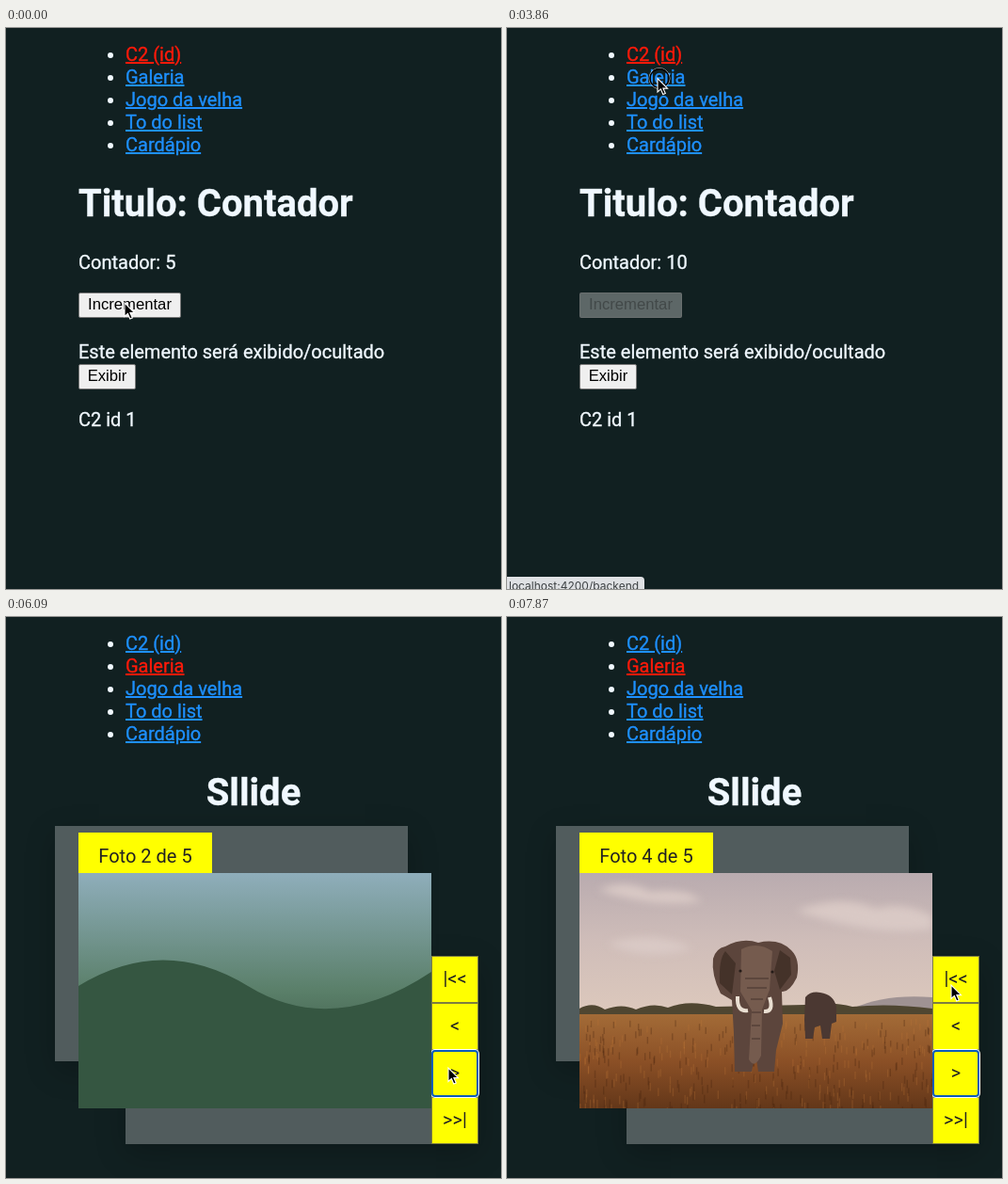
An HTML page with a canvas for the animation above (8000 ms loop, 526 by 596 pixels).

```html
<!DOCTYPE html>
<html lang="pt">
<head>
<meta charset="utf-8">
<title>Contador e galeria</title>
<style>
  html, body { margin: 0; width: 100%; height: 100%; overflow: hidden; }
  body { position: relative; background: #112021; color: #f0f8ff; font: 20px/24px Roboto, sans-serif; }
  body > *, section > *, #pager b { position: absolute; margin: 0; white-space: nowrap; }
  section { inset: 0; }
  ul, h1, p { -webkit-text-stroke: .35px; }
  ul { left: 127px; top: 16px; padding: 0; list-style: disc; }
  li { color: #1e90ff; text-decoration: underline; }
  li.on { color: #ff1a0a; }
  li::marker { color: #f0f8ff; }
  h1 { left: 77px; top: 163px; font: bold 40px/48px Roboto, sans-serif; }
  #gallery h1 { left: 0; width: 526px; text-align: center; }
  p { left: 77px; }
  .btn { left: 77px; height: 27px; box-sizing: border-box; border: 1px solid #767676; border-radius: 2px;
         background: #efefef; color: #000; font: 16.67px/24px "Liberation Sans", Arial, sans-serif; text-align: center; }
  .btn.off { background: rgba(239,239,239,.34); border-color: rgba(118,118,118,.5); color: rgba(16,16,16,.35); }
  .card { width: 375px; background: rgba(255,255,255,.27); box-shadow: 0 10px 30px rgba(0,0,0,.22); }
  #back { left: 77px; top: 272px; height: 250px; }
  #pager { left: 77px; top: 322px; height: 200px; }
  #pager b { left: 325px; width: 50px; height: 50px; box-sizing: border-box; border: 1px solid #7d7d40; background: #ff0;
             color: #222; font-weight: 400; line-height: 46px; text-align: center; }
  #pager b.focus { border: 2px solid #0b5cb8; border-radius: 4px; box-shadow: 0 0 0 1px #fff; line-height: 44px; z-index: 1; }
  #photo { left: 77px; top: 272px; }
  #label { left: 77px; top: 229px; width: 142px; height: 43px; background: #ff0; color: #222; line-height: 50px; text-align: center; }
  #status { left: 0; top: 583px; width: 144px; height: 13px; padding-left: 2px; overflow: hidden; background: #dfe1e4;
            color: #3c4043; border-radius: 0 4px 0 0; font: 12px/19px Inter, sans-serif; }
  #cursor { left: 0; top: 0; overflow: visible; }
</style>
</head>
<body>
<ul><li>C2 (id)</li><li>Galeria</li><li>Jogo da velha</li><li>To do list</li><li>Cardápio</li></ul>

<section id="counter">
  <h1>Titulo: Contador</h1>
  <p id="count" style="top:237px"></p>
  <div id="inc" class="btn" style="top:281px;width:109px">Incrementar</div>
  <p id="extra" style="top:332px">Este elemento será exibido/ocultado</p>
  <div id="toggle" class="btn" style="width:61px">Exibir</div>
  <p id="route">C2 id 1</p>
</section>

<section id="gallery">
  <h1>Sllide</h1>
  <div id="back" class="card"></div>
  <div id="pager" class="card"><b>|&lt;&lt;</b><b>&lt;</b><b>&gt;</b><b>&gt;&gt;|</b></div>
  <canvas id="photo" width="375" height="250"></canvas>
  <div id="label"></div>
</section>

<div id="status">localhost:4200/backend</div>
<svg id="cursor" width="1" height="1">
  <g id="press" fill="none">
    <circle cx="2" cy="0" r="11" stroke="#fff" stroke-opacity=".6"/>
    <circle cx="2" cy="0" r="10" stroke="#000" stroke-width="1.3"/>
  </g>
  <path d="M0 0V14.5L3.4 11.4L5.8 17L8.3 15.9L5.9 10.6H10.5Z" fill="#000" stroke="#fff" stroke-width="1.1"/>
</svg>

<script>
const $ = id => document.getElementById(id);
const g = $('photo').getContext('2d');
const LOOP = 8000, STEP = 148.4;

// Pointer path: step, x, y
const path = [
  [0, 126, 292], [5, 126, 293], [6, 119, 315], [7, 106, 345], [8, 101, 357], [10, 100, 370],
  [13, 100, 371], [15, 101, 362], [17, 101, 353], [21, 101, 351], [22, 102, 350], [23, 122, 190],
  [24, 148, 72], [25, 160, 54], [27, 160, 53], [28, 196, 120], [29, 270, 320], [30, 314, 431],
  [32, 372, 453], [34, 445, 473], [36, 470, 479], [42, 470, 479], [43, 467, 440], [45, 466, 434],
  [48, 466, 434], [49, 469, 470], [51, 470, 480], [52, 471, 432], [53, 472, 391]
];
const presses = [10, 21, 26, 40, 45, 47, 50];
// Slide changes: first step, slide number
const slides = [[0, 1], [41, 2], [44, 1], [45, 5], [47, 4], [48, 3], [51, 4]];

function pointer(n) {
  const i = path.findIndex(p => p[0] >= n);
  const b = path[i], a = path[Math.max(0, i - 1)];
  const k = b[0] === a[0] ? 0 : (n - a[0]) / (b[0] - a[0]);
  return [a[1] + (b[1] - a[1]) * k, a[2] + (b[2] - a[2]) * k];
}

function fade(y0, y1, ...colors) {
  const f = g.createLinearGradient(0, y0, 0, y1);
  colors.forEach((c, i) => f.addColorStop(i / (colors.length - 1), c));
  return f;
}
function shape(fill, d) {
  g.fillStyle = fill;
  g.fill(new Path2D(d));
}
function line(color, width, d) {
  g.strokeStyle = color;
  g.lineWidth = width;
  g.stroke(new Path2D(d));
}
function oval(fill, x, y, rx, ry, turn = 0) {
  g.fillStyle = fill;
  g.beginPath();
  g.ellipse(x, y, rx, ry, turn, 0, 7);
  g.fill();
}
function rect(fill, x, y, w, h) {
  g.fillStyle = fill;
  g.fillRect(x, y, w, h);
}
function blur(px) {
  g.filter = px ? `blur(${px}px)` : 'none';
}
function random(seed) {
  return () => (seed = seed * 16807 % 2147483647) / 2147483647;
}

function lake() {
  rect(fade(0, 110, '#a3aab4', '#c3c7cc', '#a9b5c1'), 0, 0, 375, 130);
  blur(4);
  shape('#d6d6d6', 'M120 10Q165 -4 205 6Q240 0 262 20Q300 12 375 20V40Q340 50 300 46Q260 40 225 62Q185 72 158 52Z');
  shape('#7b8a9c', 'M95 -5H185Q165 22 125 14ZM215 16Q255 30 300 8Q330 0 380 2V16Q310 26 262 36Q225 36 215 16Z');
  oval('#e0dfdd', 180, 42, 26, 12);
  oval('#dad9d8', 250, 10, 22, 8);
  blur(1.5);
  shape(fade(50, 126, '#7488a0', '#375878'), 'M165 126L195 96L216 84L237 66L262 62L283 52L305 48L335 60L375 52V126Z');
  shape('#c3cad2', 'M226 78L240 66L262 64L248 76L240 90ZM283 54L304 49L296 62L284 74Z');
  shape('#2f4e70', 'M188 126L222 100L240 84L262 103L282 80L305 108L322 72L375 86V126Z');
  shape(fade(0, 126, '#2a4058', '#4b6278', '#2e4657'), 'M0 0H70L98 20L121 42L139 65L160 84L178 101L205 116L212 126H0Z');
  shape('#1b2f45', 'M0 0H45L58 22L34 42L66 70L100 88L135 112L150 126H0Z');
  shape('#63758a', 'M74 8L98 28L125 62L148 92L112 78L92 46Z');
  shape('#26394a', 'M0 104Q60 96 110 108L212 126H0Z');
  blur(0);
  rect(fade(126, 220, '#167f87', '#1f9698', '#2ea3a1'), 0, 126, 375, 124);
  rect('#8fd0cc', 0, 126, 290, 1.5);
  blur(2);
  shape('#d3e2e5', 'M207 133L220 142L241 152L264 166V190L226 204L148 204L158 186L176 170L188 148Z');
  shape('#9fcdd1', 'M165 176L200 166L214 178L190 186ZM222 178L250 170L246 186Z');
  blur(.7);
  shape('#8f847b', 'M0 246L30 236L72 226L108 214L148 204L180 190L228 185L262 190L300 196L375 200V250H0Z');
  shape('#565a61', 'M140 230L190 208L265 192L375 205V250H178L170 238Z');
  shape('#5c544e', 'M0 250L38 240L78 246L115 221L165 220L128 250Z');
  shape('#a59a90', 'M62 236L92 222L108 226L84 238ZM120 217L160 205L186 203L150 216Z');
  shape('#7a7c83', 'M196 216L240 197L278 202L250 219ZM220 239L260 226L296 234L290 247Z');
  line('#35383e', 1.5, 'M165 232L215 224L250 220L286 208M205 250L230 230L300 236');
  shape(fade(60, 250, '#e1ddd6', '#ddd8d0', '#c3b8ad'),
    'M315 62Q323 70 330 82L343 76Q352 90 354 102Q371 112 375 130V232L352 242L340 240L338 247L312 249' +
    'Q294 246 292 230Q288 212 284 196Q265 200 258 184Q260 155 275 142L292 136Q280 138 276 131Q277 125 290 120Q303 108 308 97Q312 78 315 62Z');
  blur(2);
  shape('#b9a998', 'M317 74L326 88L318 98ZM328 128Q352 150 340 196Q358 170 360 135ZM306 190Q312 220 304 238L296 214ZM336 205Q352 220 350 240L338 232Z');
  shape('#cdbfb0', 'M350 105Q372 125 370 200Q358 180 358 140Z');
  shape('#f0eeea', 'M268 152Q282 140 300 146L291 188Q270 194 262 180ZM308 140Q328 150 324 190L310 210Z');
  blur(0);
  oval('#24272a', 279, 130, 4, 3);
  oval('#24272a', 304, 113, 2.5, 1.5);
  line('#4a433e', 1.3, 'M281 137L296 136');
}

function forest() {
  rect(fade(0, 250, '#8faebb', '#5a7f69', '#273e2d'), 0, 0, 375, 250);
  shape('#355641', 'M0 120Q90 65 180 120T375 105V250H0Z');
}

function dusk() {
  rect(fade(0, 250, '#6b7886', '#c3a17d', '#574636'), 0, 0, 375, 250);
  shape('#51483d', 'M0 175Q110 125 210 165T375 150V250H0Z');
}

function elephant() {
  rect(fade(0, 145, '#b9abaf', '#cfbdb9', '#dcc8bc'), 0, 0, 375, 150);
  blur(4);
  shape('#d9c9c5', 'M20 18Q50 5 75 20Q115 16 130 30Q80 38 20 18ZM230 40Q280 22 315 38Q345 30 375 46V60Q310 68 230 40ZM30 75Q80 60 120 80Q70 95 30 75Z');
  blur(.7);
  shape('#9f9293', 'M290 144Q325 128 375 132V150H290Z');
  shape('#4f4631', 'M0 144Q14 136 27 145Q45 138 60 145Q78 137 94 143Q116 134 145 142L240 140Q270 136 290 142Q330 138 375 144V155H0Z');
  blur(0);
  rect(fade(150, 250, '#a36b37', '#8b5026', '#633719'), 0, 150, 375, 100);
  const r = random(41);
  for (let i = 0; i < 420; i++) {
    const x = r() * 375, y = 154 + r() * 96;
    rect(r() < .5 ? 'rgba(66,34,15,.3)' : 'rgba(190,119,58,.25)', x, y, 1.4, 3 + y / 40);
  }
  shape('#4b3832', 'M240 132Q246 125 256 127Q270 129 273 142V158L268 160L266 176H258L256 162L250 164L248 176H240L239 156Z');
  shape('#5c453c', 'M155 78Q173 68 190 74Q212 69 225 82Q235 92 231 111Q223 127 215 126L216 160L209 188L207 211H190L187 191L183 211H165L164 170L162 135L150 128Q140 108 142 91Q145 80 155 78Z');
  shape('#443229', 'M155 83Q148 91 149 117L162 129L166 96ZM213 82L207 104L213 124L225 108L224 90Z');
  shape('#755b4e', 'M172 81Q189 72 205 83L202 124L194 145L193 194Q186 209 180 198L183 146L171 126Z');
  line('#45332c', 1, 'M176 112L201 112M178 122L199 122M182 134L195 134M183 148H193M183 162H192M183 176H192');
  line('#eadfd2', 4, 'M168 131Q167 148 179 146M202 132Q207 148 196 147');
  oval('#241b18', 171, 104, 1.6, 1.6);
  oval('#241b18', 205, 105, 1.6, 1.6);
}

function bird() {
  rect(fade(0, 250, '#252e2d', '#1d2826', '#222b29'), 0, 0, 375, 250);
  blur(1);
  shape('#596163', 'M335 0H375V80H325L323 48Q329 34 336 28Z');
  shape('#8b9294', 'M344 0H352V28L336 42L329 65L327 46Z');
  shape('#b31528', 'M375 72L330 77Q283 101 250 140Q211 165 195 164L140 175Q130 182 140 190L174 195Q184 222 220 233L298 245L375 250Z');
  shape('#df344b', 'M375 78L332 84Q295 106 260 143L222 165L375 170Z');
  shape('#f4c6df', 'M331 113Q345 96 375 87V163L335 170L318 151ZM285 143L309 135L330 166L300 172Z');
  shape('#7d0d1b', 'M172 190Q270 214 375 184V205Q275 225 190 207Z');
  shape('#efaac5', 'M225 216L288 224L375 213V235L290 236L238 229Z');
  blur(0);
  oval('#d34f20', 297, 161, 17, 12, -.2);
  oval('#edcf57', 215, 217, 10, 4, .2);
  oval('#dec51e', 271, 100, 18, 20, .2);
  oval('#e9d844', 246, 122, 29, 7, .5);
  shape('#c9bd35', 'M290 130Q302 103 324 74Q331 98 307 130Z');
  oval('#f2e46c', 285, 130, 28, 16, -.1);
  oval('#f8eca2', 279, 126, 12, 7);
  shape('#897e78', 'M120 52Q132 36 152 38L174 43L236 25L238 28L178 50Q168 62 173 85Q176 115 150 145L125 175L95 200L40 243L30 240Q45 205 70 170Q82 130 115 95Q128 75 120 52Z');
  shape('#b7a49e', 'M144 66Q164 51 171 61Q166 82 172 103Q168 127 145 146L134 151Q153 122 145 96Z');
  shape('#424846', 'M121 91Q145 84 148 105Q143 130 123 150L95 178L47 224L34 236Q55 190 73 158Q91 118 121 91Z');
  line('#686c66', 1.3, 'M135 101Q106 140 58 202M142 113Q120 150 69 202');
  shape('#686d62', 'M121 52Q132 36 153 38L174 44L170 55Q140 53 124 66Z');
  oval('#151918', 151, 49, 3.5, 3);
  line('#565956', 2, 'M174 46L237 27');
  line('#3a3130', 3, 'M124 164L133 176M133 158L141 175');
}

const scenes = [lake, forest, dusk, elephant, bird];
const links = [...document.querySelectorAll('li')];
const keys = [...document.querySelectorAll('#pager b')];
keys.forEach((b, i) => b.style.top = i * 50 + 'px');
let shown = 0;

function show(el, on) {
  el.style.display = on ? '' : 'none';
}

function render(t) {
  const n = Math.min(53, Math.floor((t + 10) / STEP));
  const gallery = n >= 27;
  links.forEach((li, i) => li.classList.toggle('on', i === +gallery));
  show($('counter'), !gallery);
  show($('gallery'), gallery);
  show($('status'), n >= 25 && n < 32);

  const count = Math.min(10, 5 + n);
  $('count').textContent = 'Contador: ' + count;
  $('inc').classList.toggle('off', count === 10);
  const open = n < 11 || n >= 22, dy = open ? 24 : 0;
  show($('extra'), open);
  $('toggle').style.top = 333 + dy + 'px';
  $('route').style.top = 380 + dy + 'px';

  // Cards fan out while the pointer is over the photo
  const k = Math.min(1, Math.max(0, (n * STEP - 4325) / 600));
  const p = 1 - (1 - k) ** 3;
  const slideBy = (id, x, y) => $(id).style.transform = `translate(${Math.round(x * p)}px,${Math.round(y * p)}px)`;
  slideBy('back', -25, -50);
  slideBy('pager', 50, 38);
  const focus = n < 40 ? -1 : n < 44 ? 2 : n < 50 ? 1 : 2;
  keys.forEach((b, i) => b.classList.toggle('focus', i === focus));

  const slide = slides.filter(s => s[0] <= n).pop()[1];
  if (slide !== shown) {
    scenes[slide - 1]();
    $('label').textContent = `Foto ${slide} de 5`;
    shown = slide;
  }

  const [x, y] = pointer(n);
  $('cursor').style.transform = `translate(${x}px,${y}px)`;
  show($('press'), presses.includes(n));
}

const start = performance.now();
function tick() {
  render((performance.now() - start) % LOOP);
  requestAnimationFrame(tick);
}
tick();
</script>
</body>
</html>
```
